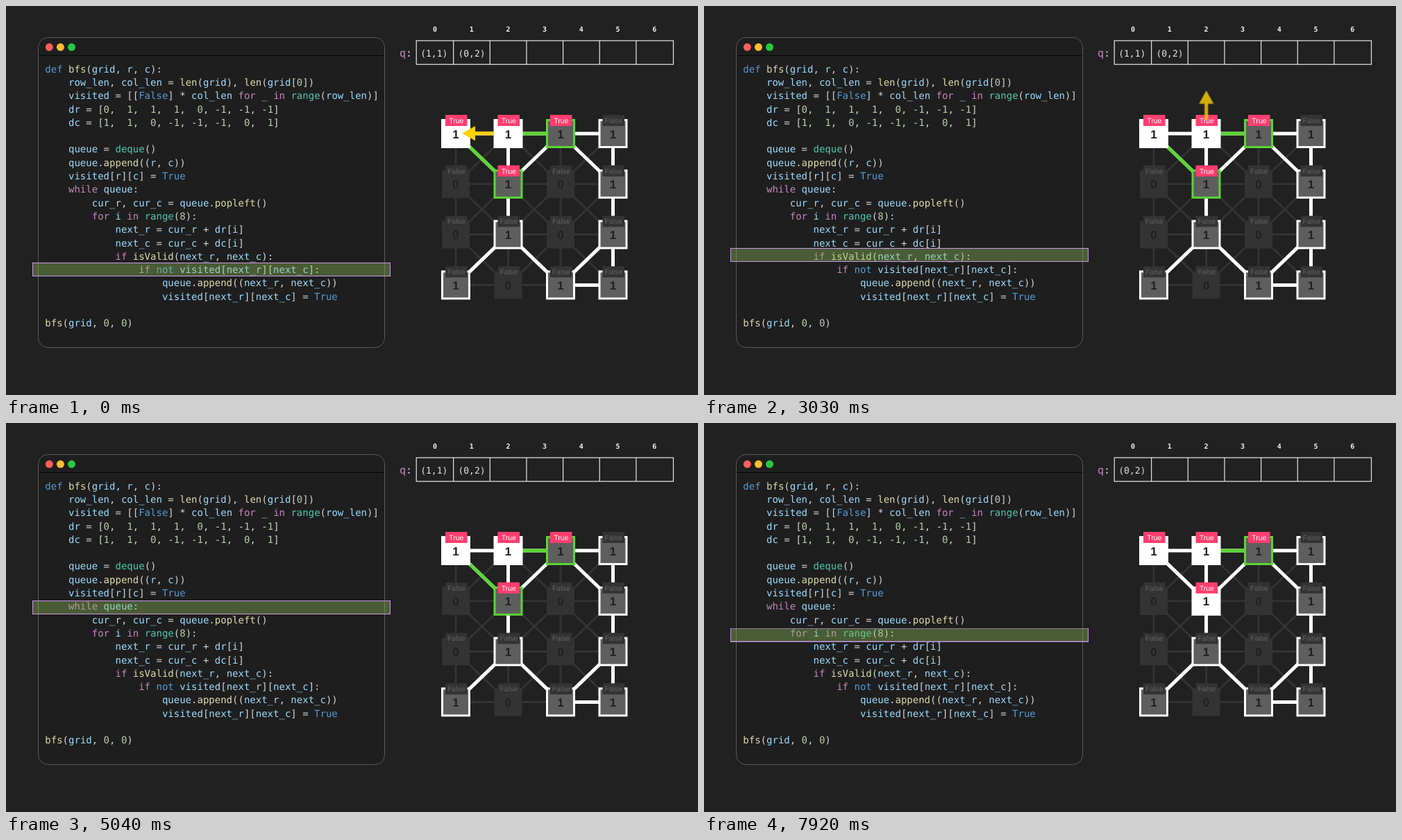
An HTML page that plays this animation: 997x561 px, repeating every 8 s.

```html
<!DOCTYPE html>
<html lang="en">
<head>
<meta charset="utf-8">
<title>BFS on a grid</title>
<style>
  html, body { margin: 0; width: 100%; height: 100%; overflow: hidden; background: #212121; }
  svg { display: block; width: 100vw; height: 100vh; }
  text { white-space: pre; text-rendering: geometricPrecision; }
  .mono { font: 14px "DejaVu Sans Mono", monospace; fill: #d4d4d4; }
  .index { font: bold 10px "DejaVu Sans Mono", monospace; fill: #f2f2f2; text-anchor: middle; }
  .item { font: 13px "DejaVu Sans Mono", monospace; fill: #e4e4e4; text-anchor: middle; }
  .value { font: bold 17px "Liberation Sans", Arial, sans-serif; fill: #202020; text-anchor: middle; }
  .label { font: 10.5px "Liberation Sans", Arial, sans-serif; text-anchor: middle; }
</style>
</head>
<body>
<svg viewBox="0 0 997 561">
  <rect width="997" height="561" fill="#212121"/>
  <rect x="46.5" y="45.5" width="499" height="447" rx="14" fill="#1e1e1e" stroke="#5a5a5a"/>
  <path d="M47 71.5H545" stroke="#050505"/>
  <circle cx="62.3" cy="59.3" r="5.5" fill="#ff5f57"/>
  <circle cx="78.4" cy="59.3" r="5.5" fill="#febc2e"/>
  <circle cx="94.5" cy="59.3" r="5.5" fill="#28c840"/>
  <g id="code"></g>
  <g id="oldCode"></g>
  <g id="newCode"></g>
  <g id="queue"></g>
  <g id="edges"></g>
  <g id="cells"></g>
  <g id="arrows" fill="#ffd000"></g>
  <rect id="cursor" x="38.5" y=".5" width="515" height="19" fill="#91c35f" fill-opacity=".38" stroke="#cb96ea"/>
</svg>
<script>
const LOOP = 8000, FIRST = 60, STEP = 724, MOVE = 630;
const EASE = 'cubic-bezier(.364,0,.636,1)';
const $ = id => document.getElementById(id);

function add(parent, tag, attrs, content = '') {
  const el = document.createElementNS('http://www.w3.org/2000/svg', tag);
  for (const name in attrs) el.setAttribute(name, attrs[name]);
  el.textContent = content;
  return parent.appendChild(el);
}

// Animates one property through [time, value] points.
function track(el, prop, points) {
  const all = [[0, points[0][1]], ...points, [LOOP, points.at(-1)[1]]];
  el.animate(
    all.map(([time, value]) => ({ offset: time / LOOP, [prop]: value, easing: EASE })),
    { duration: LOOP, iterations: Infinity });
}
const at = (step, part = 0) => FIRST + step * STEP + part * MOVE;
const change = (step, from, to, start = 0, end = 1) => [[at(step, start), from], [at(step, end), to]];
const fadeIn = step => change(step, 0, 1, .68, 1);
const fadeOut = step => change(step, 1, 0, 0, .4);

// Code
const COLORS = [
  [/^(while|for|in|if)$/, '#c586c0'],
  [/^(def|not|True|False)$/, '#569cd6'],
  [/^(range|deque)$/, '#4ec9b0'],
  [/^\d/, '#b5cea8'],
  [/^\w/, '#9cdcfe']
];
function writeCode(group, row, col, source) {
  const text = add(group, 'text', { class: 'mono', x: 56.3 + col * 8.428, y: 95.6 + row * 19.3 });
  for (const { 0: token, index } of source.matchAll(/\w+|\W+/g)) {
    let color = (COLORS.find(([pattern]) => pattern.test(token)) || [0, '#d4d4d4'])[1];
    if (color === '#9cdcfe' && source[index + token.length] === '(') color = '#dcdcaa';
    add(text, 'tspan', { fill: color }, token);
  }
}
`def bfs(grid
    row_len, col_len = len(grid), len(grid[0])
    visited = [[False] * col_len for _ in range(row_len)]
    dr = [0,  1,  1,  1,  0, -1, -1, -1]
    dc = [1,  1,  0, -1, -1, -1,  0,  1]

    queue = deque()
    queue.append(
    visited[ ][ ] = True
    while queue:
        cur_r, cur_c = queue.popleft()
        for i in range(8):
            next_r = cur_r + dr[i]
            next_c = cur_c + dc[i]
            if isValid(next_r, next_c):
                if not visited[next_r][next_c]:
                    queue.append((next_r, next_c))
                    visited[next_r][next_c] = True

bfs(grid`.split('\n').forEach((line, row) => writeCode($('code'), row, 0, line));

[[0, 12, ', r, c):', '):'], [7, 17, '(r, c))', '0, 0)'], [8, 12, 'r', '0'],
 [8, 15, 'c', '0'], [19, 8, ', 0, 0)', ')']].forEach(([row, col, before, after]) => {
  writeCode($('oldCode'), row, col, before);
  writeCode($('newCode'), row, col, after);
});
track($('oldCode'), 'opacity', [...change(2, 1, 0), ...change(3, 0, 1)]);
track($('newCode'), 'opacity', [...change(2, 0, 1), ...change(3, 1, 0)]);

const stops = [370, 293, 352, 294, 351, 292, 349, 256, 274, 295.5, 353, 295.5];
track($('cursor'), 'transform', stops.slice(1).flatMap((top, i) =>
  change(i, `translateY(${stops[i]}px)`, `translateY(${top}px)`)));

// Queue
const queue = $('queue');
add(queue, 'rect', { x: 591.2, y: 50, width: 370.3, height: 34.2, fill: 'none', stroke: '#e8e8e8', 'stroke-width': 1.2 });
for (let i = 0; i < 7; i++) {
  add(queue, 'text', { class: 'index', x: 618 + i * 52.7, y: 37.3 }, i);
  if (i) add(queue, 'path', { d: `M${592 + i * 52.65} 50V84`, stroke: '#e8e8e8', 'stroke-width': 1.2 });
}
const name = add(queue, 'text', { class: 'mono', x: 567, y: 73, style: 'font-size:15px' });
add(name, 'tspan', { fill: '#c586c0' }, 'q');
add(name, 'tspan', {}, ':');
const head = add(queue, 'text', { class: 'item', x: 616.8, y: 72.6 }, '(1,1)');
const next = add(queue, 'text', { class: 'item', x: 671, y: 72.6 }, '(0,2)');
track(head, 'opacity', fadeOut(7));
track(next, 'transform', change(7, 'translateX(0px)', 'translateX(-54.2px)'));

// Graph
const GRID = ['1111', '0101', '0101', '1011'];
const GREEN = '#5bd535';
const cx = c => 648 + c * 75.5, cy = r => 184 + r * 72.8;
const isLand = (r, c) => GRID[r][c] === '1';

function drawEdge(r1, c1, r2, c2, color) {
  return add($('edges'), 'path', {
    d: `M${cx(c1)} ${cy(r1)}L${cx(c2)} ${cy(r2)}`, stroke: color, 'stroke-width': color === '#333' ? 3 : 5
  });
}
const edges = [];
GRID.forEach((_, r) => {
  for (let c = 0; c < 4; c++)
    for (const [dr, dc] of [[0, 1], [1, 1], [1, 0], [1, -1]])
      if (GRID[r + dr]?.[c + dc]) edges.push([r, c, r + dr, c + dc]);
});
const isBright = ([r, c, r2, c2]) => isLand(r, c) && isLand(r2, c2);
edges.filter(e => !isBright(e)).forEach(e => drawEdge(...e, '#333'));
edges.filter(isBright).forEach(e => drawEdge(...e, '#fff'));
drawEdge(0, 1, 0, 2, GREEN);
const firstLink = drawEdge(0, 0, 1, 1, GREEN);
track(firstLink, 'stroke', change(7, GREEN, '#ffffff'));

function drawCell(r, c) {
  const x = cx(c), y = cy(r), key = `${r}${c}`;
  const land = isLand(r, c), done = key === '00' || key === '01', queued = key === '02' || key === '11';
  const size = land ? 39 : 40;
  const box = add($('cells'), 'rect', {
    x: x - size / 2, y: y - size / 2, width: size, height: size,
    fill: done ? '#ffffff' : land ? '#5e5e5e' : '#333',
    stroke: queued ? GREEN : land ? '#ffffff' : 'none', 'stroke-width': 3
  });
  if (key === '11') {
    track(box, 'fill', change(7, '#5e5e5e', '#ffffff'));
    track(box, 'stroke', change(7, GREEN, '#ffffff'));
  }
  add($('cells'), 'text', { class: 'value', x, y: y + 6.6 }, GRID[r][c]);
  const seen = done || queued;
  add($('cells'), 'rect', { x: x - 15, y: y - 27, width: 31.5, height: 16, fill: seen ? '#ff3d6e' : '#333' });
  add($('cells'), 'text', { class: 'label', x: x + .8, y: y - 15.2, fill: seen ? '#fff' : '#626262' }, seen ? 'True' : 'False');
}
GRID.forEach((_, r) => { for (let c = 0; c < 4; c++) drawCell(r, c); });

// Arrows
function drawArrow(x1, y1, x2, y2, points) {
  const length = Math.hypot(x2 - x1, y2 - y1), neck = length - 19;
  const angle = Math.atan2(y2 - y1, x2 - x1) * 180 / Math.PI;
  const arrow = add($('arrows'), 'path', {
    d: `M0-2.5H${neck}V-10.5L${length} 0L${neck} 10.5V2.5H0Z`,
    transform: `translate(${x1} ${y1}) rotate(${angle})`
  });
  track(arrow, 'opacity', points);
}
drawArrow(703, 183.7, 657, 183.7, fadeOut(0));
drawArrow(703.5, 163.5, 673, 134, [...fadeIn(1), ...fadeOut(2)]);
drawArrow(723.7, 163.5, 723.7, 122, [...fadeIn(3), ...fadeOut(4)]);
drawArrow(744, 163.5, 774.5, 134, [...fadeIn(5), ...fadeOut(6)]);
drawArrow(744.5, 256.8, 790, 256.8, [...fadeIn(9), ...fadeOut(10)]);
</script>
</body>
</html>
```
